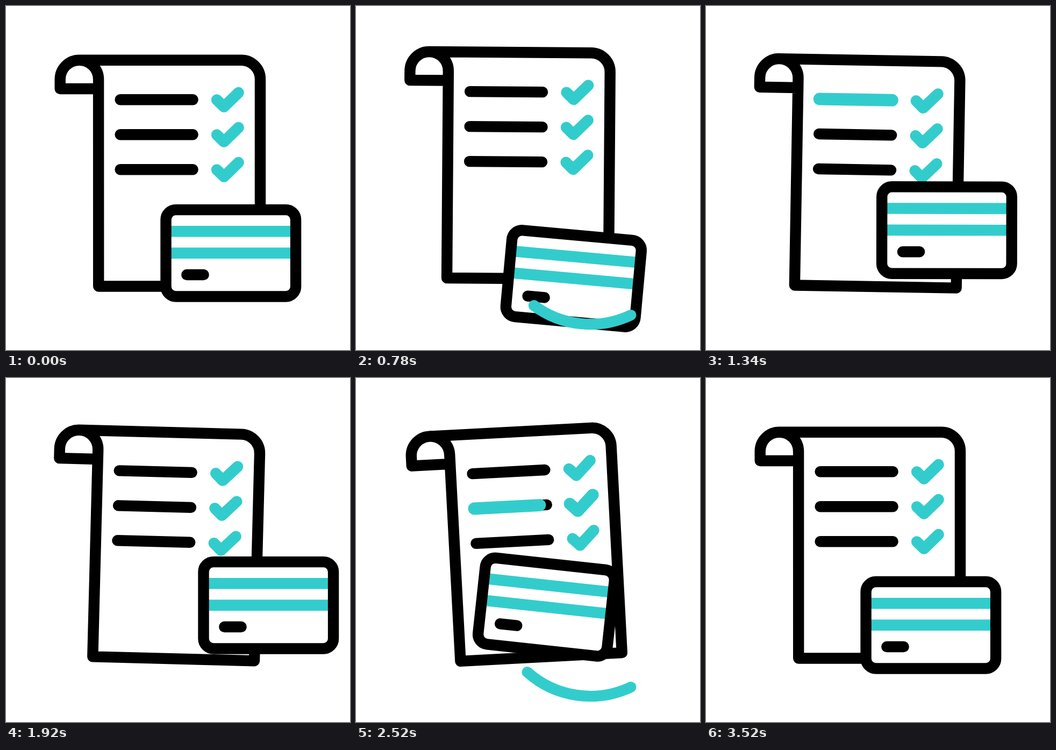
Write an HTML page with a canvas that moves like this. It is 640x640 px and loops after 3.6 s.

```html
<!DOCTYPE html>
<html lang="en">
<head>
<meta charset="utf-8">
<title>Receipt and card</title>
<style>
  html, body { margin: 0; width: 100%; height: 100%; overflow: hidden; background: #fff; }
  canvas { display: block; width: 640px; height: 640px; }
</style>
</head>
<body>
<canvas id="stage" width="640" height="640"></canvas>
<script>
const ctx = document.getElementById('stage').getContext('2d');
const LOOP = 3600, STEP = 20, STROKE = 20.4;
const BLACK = '#000', TEAL = '#33cccc';
const RIGHT = [70, -37], LEFT = [-65, -37];
const rows = [174.3, 239.3, 304.3];

const clamp = v => Math.min(1, Math.max(0, v));
const mix = (a, b, p) => a + (b - a) * p;
const linear = (t, from, to) => clamp((t - from) / (to - from));
const ease = (t, from, to) => {
  const p = linear(t, from, to);
  return p * p * (3 - 2 * p);
};

// Eased value along a list of [time, value] keys.
function track(t, keys) {
  let value = keys[0][1];
  for (let i = 1; i < keys.length; i++) {
    value += (keys[i][1] - keys[i - 1][1]) * ease(t, keys[i - 1][0], keys[i][0]);
  }
  return value;
}

const bezier = (a, b, c, d, u) => {
  const v = 1 - u;
  return a * v * v * v + 3 * b * v * v * u + 3 * c * v * u * u + d * u * u * u;
};

function stroke(color, width, build) {
  ctx.strokeStyle = color;
  ctx.lineWidth = width;
  ctx.beginPath();
  build();
  ctx.stroke();
}

const line = (color, width, x1, y1, x2, y2) => stroke(color, width, () => {
  ctx.moveTo(x1, y1);
  ctx.lineTo(x2, y2);
});

function drawSheet() {
  stroke(BLACK, STROKE, () => {
    ctx.moveTo(172.2, 154);
    ctx.lineTo(100.7, 154);
    ctx.lineTo(100.7, 136.4);
    ctx.arc(136.4, 136.4, 35.7, Math.PI, 2 * Math.PI);
    ctx.lineTo(172.2, 521.5);
    ctx.lineTo(473, 521.5);
    ctx.lineTo(473, 136);
    ctx.arc(437.7, 136, 35.3, 0, -Math.PI / 2, true);
    ctx.lineTo(136.4, 100.7);
  });
}

function drawCheck(y, scale) {
  ctx.save();
  ctx.translate(412.4, y);
  ctx.scale(scale, scale);
  stroke(TEAL, 20.6, () => {
    ctx.moveTo(-20.2, .3);
    ctx.lineTo(-6.9, 13.4);
    ctx.lineTo(20.2, -13.2);
  });
  ctx.restore();
}

function drawRow(t, y, start) {
  line(BLACK, STROKE, 212.6, y, 347.6, y);
  let pulse = 0;
  if (start) {
    const head = ease(t, start, start + 260);
    const tail = ease(t, start + 550, start + 740);
    if (head > 0 && tail < 1) {
      line(TEAL, 23, mix(212.6, 347.6, tail), y, mix(212.6, 347.6, head), y);
    }
    pulse = Math.sin(Math.PI * linear(t, start + 180, start + 420));
  }
  drawCheck(y, 1 + .2 * pulse);
}

function drawPaper(t) {
  const lift = track(t, [[120, 0], [460, -80], [900, 0]]);
  const tilt = track(t, [[660, 0], [1165, 3], [1617, -3], [2068, 3], [2520, -3], [2960, 0]]);
  ctx.save();
  ctx.translate(287, 100 + lift);
  ctx.rotate(tilt * Math.PI / 180);
  ctx.translate(-287, -100);
  drawSheet();
  drawRow(t, rows[0], 800);
  drawRow(t, rows[1], 2310);
  drawRow(t, rows[2], 0);
  ctx.restore();
}

// Swipe down and left along a curve, then glide back to the right.
function swipePose(t, start) {
  const back = start + 537;
  if (t < back) {
    const u = ease(t, start, start + 500);
    return {
      x: bezier(RIGHT[0], 50, -43, LEFT[0], u),
      y: bezier(RIGHT[1], 90, 73, LEFT[1], u),
      angle: 6.2 * (1 - (1 - u) * (1 - u))
    };
  }
  const p = ease(t, back, back + 480);
  return {
    x: mix(LEFT[0], RIGHT[0], p),
    y: mix(LEFT[1], RIGHT[1], p) - 7 * Math.sin(Math.PI * p),
    angle: 6.2 * (1 - ease(t, back, back + 330))
  };
}

function cardPose(t) {
  if (t >= 497 && t < 2050) return swipePose(t, 497);
  if (t >= 2050 && t < 3190) return swipePose(t, 2050);
  const p = track(t, [[120, 0], [460, 1], [3195, 1], [3525, 0]]);
  return { x: RIGHT[0] * p, y: RIGHT[1] * p, angle: 0 };
}

function drawCard(t) {
  const { x, y, angle } = cardPose(t);
  ctx.save();
  ctx.translate(418.3 + x, 459.8 + y);
  ctx.rotate(angle * Math.PI / 180);
  ctx.beginPath();
  ctx.roundRect(-120.8, -80.7, 241.6, 161.4, 18.5);
  ctx.fillStyle = '#fff';
  ctx.fill();
  ctx.fillStyle = TEAL;
  ctx.fillRect(-115, -50.8, 230, 20.6);
  ctx.fillRect(-115, -10.4, 230, 20.6);
  ctx.strokeStyle = BLACK;
  ctx.lineWidth = STROKE;
  ctx.stroke();
  line(BLACK, STROKE, -82, 40.2, -50.7, 40.2);
  ctx.restore();
}

function drawTrail(t, start) {
  const head = ease(t, start, start + 300);
  const tail = ease(t, start + 449, start + 659);
  if (head <= 0 || tail >= 1) return;
  const angle = p => mix(64.7, 131.8, p) * Math.PI / 180;
  stroke(TEAL, STROKE, () => ctx.arc(436, 416, 176, angle(tail), angle(head)));
}

function drawBurst(t) {
  const head = ease(t, 2860, 2970), tail = ease(t, 2930, 3075);
  const size = STROKE * (1 - ease(t, 3085, 3160));
  if (t < 2860 || size <= 0) return;
  for (const [x, y] of [[460, 32], [512.5, 69], [541, 129.3]]) {
    const at = p => [mix(440, x, mix(.7, 1, p)), mix(132, y, mix(.7, 1, p))];
    const [x1, y1] = at(tail), [x2, y2] = at(head);
    line(TEAL, size, x1, y1, x2 + .01, y2);
  }
}

function frame(now) {
  const t = Math.floor((now % LOOP) / STEP) * STEP;
  ctx.fillStyle = '#fff';
  ctx.fillRect(0, 0, 640, 640);
  ctx.lineCap = ctx.lineJoin = 'round';
  drawPaper(t);
  drawCard(t);
  drawTrail(t, 531);
  drawTrail(t, 2084);
  drawBurst(t);
}

const begin = performance.now();
function tick() {
  frame(performance.now() - begin);
  requestAnimationFrame(tick);
}
tick();
</script>
</body>
</html>
```
